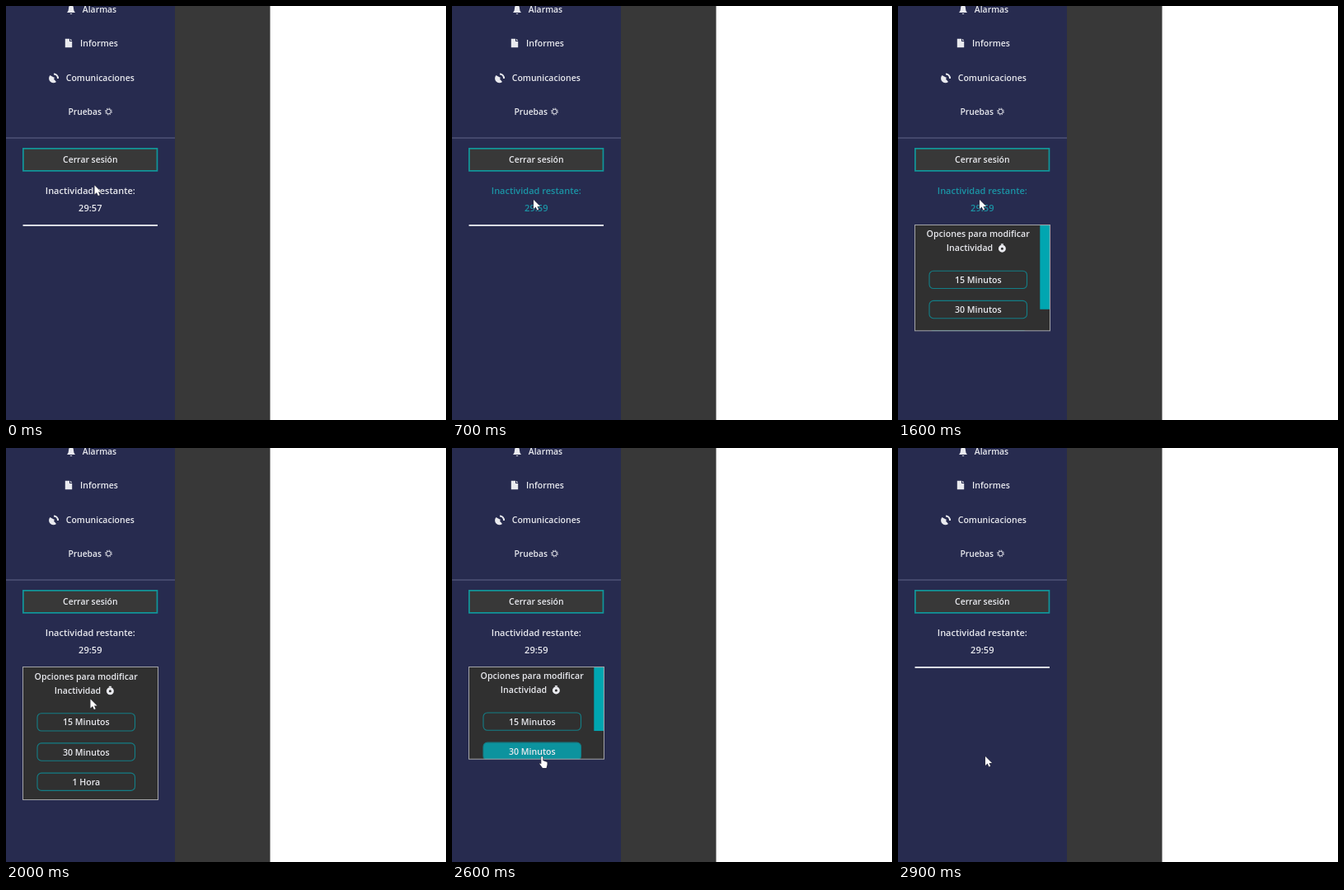
An HTML page with a canvas for the animation above (3000 ms loop, 534 by 502 pixels).

```html
<!DOCTYPE html>
<html lang="es">
<head>
<meta charset="utf-8">
<title>Menú lateral</title>
<style>
html, body { margin: 0; height: 100%; overflow: hidden; background: #fff; }
canvas { display: block; }
</style>
</head>
<body>
<canvas id="stage" width="534" height="502"></canvas>
<script>
const ctx = document.getElementById('stage').getContext('2d');
const LOOP = 3000, STEP = 100;
const WHITE = '#e9eaef', NAVY = '#272b4f', GREY = '#383838', PANEL = '#303030', TEAL = '#10979b';
const PANEL_TOP = 265.5, PANEL_HEIGHT = 161;
const OPTIONS = ['15 Minutos', '30 Minutos', '1 Hora'];

const BELL = 'M-5 4Q-3 2-3-1A3 4 0 0 1 3-1Q3 2 5 4ZM-1.5 5H1.5Q0 7-1.5 5Z';
const PAGE = 'M-4.2-5.3H1V-2H4.2V5.3H-4.2ZM2-5.3L4.2-3H2Z';
const DISH = 'M-4.5-3A5.5 5.5 0 0 0 3 5L0 1.5 1 0-1-1ZM0-5.5A6 6 0 0 1 6 1H4A4 4 0 0 0 0-3.5Z';
const ARROW = 'M0 0V11L2.6 8.6 4.4 12.5 6.2 11.7 4.5 8H8Z';
const HAND = 'M2.3 1A1 1 0 0 1 4.3 1V5L9.5 7V10L8.5 14H4L0 8.5 2.3 9Z';

const clamp = v => Math.min(1, Math.max(0, v));
const ramp = (t, start, end) => clamp((t - start) / (end - start));
const smooth = p => p * p * (3 - 2 * p);
const mix = (a, b, p) => a + (b - a) * p;

function rect(x, y, w, h, color) {
  ctx.fillStyle = color;
  ctx.fillRect(x, y, w, h);
}

function text(str, x, y, size = 10.6, color = WHITE, align = 'center') {
  ctx.font = `600 ${size}px "Open Sans", "Noto Sans", sans-serif`;
  ctx.textAlign = align;
  ctx.fillStyle = color;
  ctx.fillText(str, x, y);
}

function shape(d, x, y, fill = WHITE, stroke = 'transparent') {
  const path = new Path2D(d);
  ctx.save();
  ctx.translate(x, y);
  ctx.strokeStyle = stroke;
  ctx.lineWidth = 1;
  ctx.stroke(path);
  ctx.fillStyle = fill;
  ctx.fill(path);
  ctx.restore();
}

function ring(x, y, radius, width, dash = []) {
  ctx.beginPath();
  ctx.arc(x, y, radius, 0, Math.PI * 2);
  ctx.setLineDash(dash);
  ctx.lineWidth = width;
  ctx.strokeStyle = WHITE;
  ctx.stroke();
  ctx.setLineDash([]);
}

function cursorAt(t) {
  const trip = ramp(t, 0, 600);
  const descent = smooth(ramp(t, 1700, 2300));
  return {
    x: mix(107.5, 99, trip) + 7 * descent,
    y: mix(217.5, 235, trip) - 290 * Math.sin(Math.PI * trip) + 139 * descent
  };
}

function panelHeight(t) {
  const opening = 1 - (1 - ramp(t, 1500, 1700)) ** 2.3;
  const closing = (1 - ramp(t, 2500, 2900)) ** 1.27;
  return PANEL_HEIGHT * opening * closing;
}

function drawMenu(t) {
  rect(0, 0, 534, 502, '#fff');
  rect(320, 0, 1, 502, '#8f8f8f');
  rect(205, 0, 115, 502, GREY);
  rect(0, 0, 205, 502, NAVY);

  shape(BELL, 79, 4);
  shape(PAGE, 76, 45);
  shape(DISH, 58, 87);
  text('Alarmas', 113.5, 8, 10.4);
  text('Informes', 113, 49, 10.5);
  text('Comunicaciones', 114.3, 90.7, 10.5);
  text('Pruebas', 95.7, 132, 10.3);
  ring(124.5, 128, 2.8, 1);
  ring(124.5, 128, 3.9, 1, [1.5, 1.56]);
  rect(0, 159.5, 205, 1, '#62668a');

  const glow = .45 * Math.sin(Math.PI * ramp(t, 0, 600));
  rect(20, 172, 164.3, 28.7, TEAL);
  rect(21.7, 173.7, 160.9, 25.3, GREY);
  rect(21.7, 173.7, 160.9, 25.3, `rgba(16,151,155,${glow})`);
  text('Cerrar sesión', 102.3, 190, 10.4);

  const tint = ramp(t, 400, 600) - ramp(t, 1800, 2000);
  const color = `rgb(${mix(233, 27, tint)} ${mix(234, 148, tint)} ${mix(239, 165, tint)})`;
  text('Inactividad restante:', 102.3, 228, 11, color);
  text(t < 100 ? '29:57' : '29:59', 102.3, 249.3, 11.1, color);
}

function drawOption(label, y, hover) {
  ctx.beginPath();
  ctx.roundRect(38, y, 118.5, 21.3, 5);
  ctx.fillStyle = `rgba(12,147,158,${hover})`;
  ctx.fill();
  ctx.strokeStyle = '#137e86';
  ctx.lineWidth = 1.1;
  ctx.stroke();
  text(label, 97.3, y + 14.7);
}

function drawPanel(height, hovers) {
  if (!height) {
    rect(20.5, 265, 163.5, 2, '#d9dbe2');
    return;
  }
  ctx.save();
  ctx.beginPath();
  ctx.rect(20, PANEL_TOP, 165, height);
  ctx.clip();
  rect(20, PANEL_TOP, 165, height, PANEL);
  ctx.translate(0, 2.5 * (height / PANEL_HEIGHT - 1));
  text('Opciones para modificar', 97.2, 281);
  text('Inactividad', 87, 298);
  ring(126.4, 294.7, 3, 3);
  rect(124.9, 288.8, 3, 1.5, WHITE);
  OPTIONS.forEach((label, i) => drawOption(label, 321.7 + i * 36.2, hovers[i]));
  ctx.restore();

  if (height < PANEL_HEIGHT) rect(172.3, PANEL_TOP, 11.7, height * height / PANEL_HEIGHT, '#00a6b1');
  ctx.strokeStyle = '#a3a4a8';
  ctx.lineWidth = 1;
  ctx.strokeRect(20.5, PANEL_TOP, 164, height);
}

function frame(now) {
  const t = Math.floor(now % LOOP / STEP) * STEP;
  const cursor = cursorAt(t);
  const height = panelHeight(t);
  const inPanel = cursor.y < PANEL_TOP + height;
  const hovers = OPTIONS.map((_, i) =>
    inPanel ? clamp(1.5 - Math.abs(cursor.y - 332.4 - i * 36.2) / 15) : 0);

  drawMenu(t);
  drawPanel(height, hovers);
  shape(Math.max(...hovers) > .5 ? HAND : ARROW, cursor.x, cursor.y, '#fff', '#30303a');
  requestAnimationFrame(frame);
}
frame(performance.now());
</script>
</body>
</html>
```
